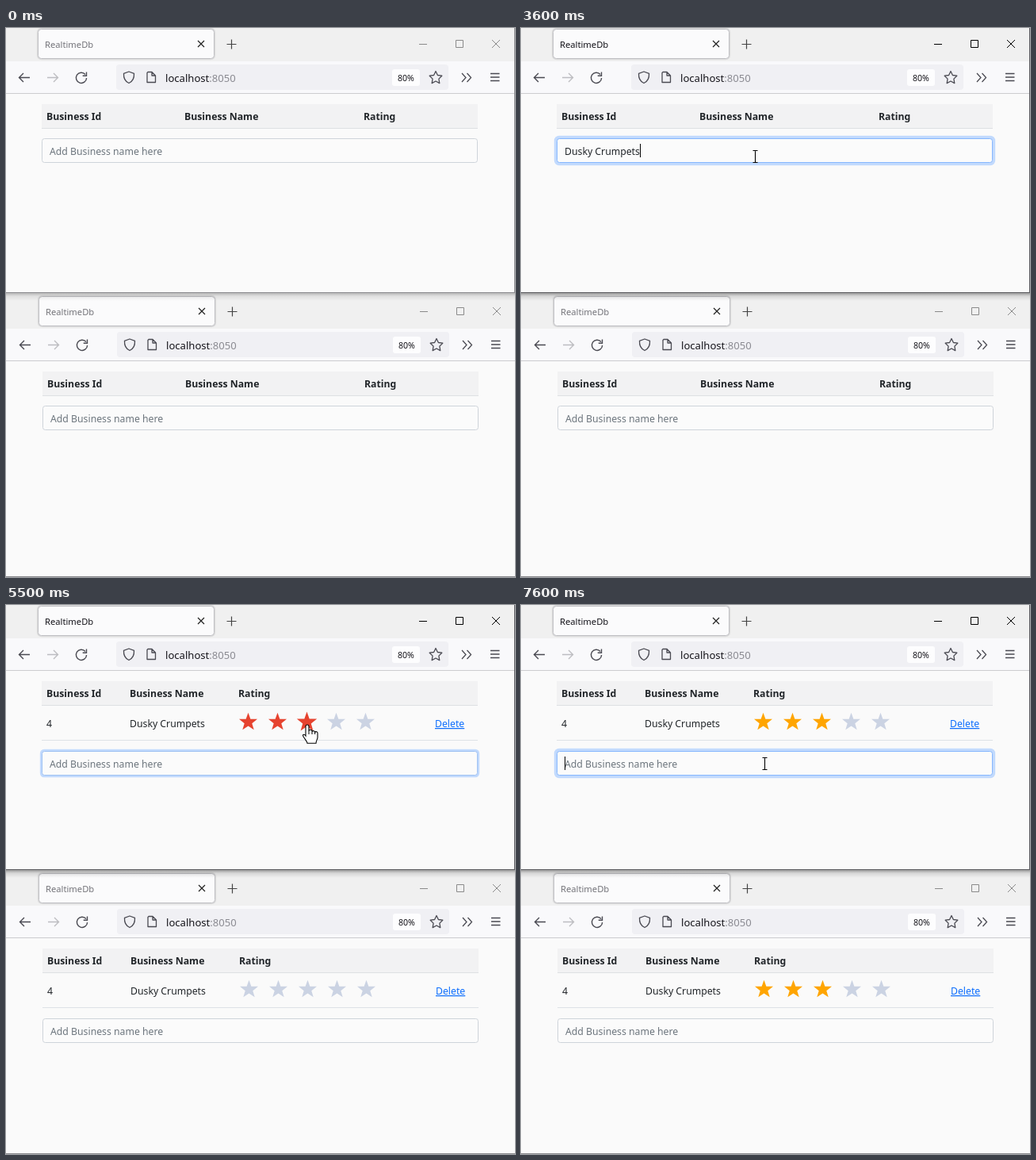
An HTML page that plays this animation: 642 px wide and 692 px high, repeating every 8000 ms.

```html
<!DOCTYPE html>
<html lang="en">
<head>
<meta charset="utf-8">
<title>RealtimeDb</title>
<style>
html, body { margin: 0; width: 100%; height: 100%; overflow: hidden; background: #fafafa; }
svg { display: block; font-family: "Noto Sans", sans-serif; }
text { white-space: pre; }
</style>
</head>
<body>
<svg id="stage" width="642" height="692" viewBox="0 0 642 692" xmlns="http://www.w3.org/2000/svg"></svg>
<script>
const LOOP = 8000, STEP = 100, SIZE = 12.25;
const NAME = "Dusky Crumpets";
const KEY_TIMES = [1300, 1500, 1800, 1900, 2100, 2300, 2600, 2800, 3000, 3100, 3200, 3400, 3500, 3600];
const ADDED = 3800;
const INK = "#212529", EMPTY = [203, 211, 227], HOVER = [230, 67, 47], RATED = [255, 165, 0];

// Pointer stops: time, x, y, shape
const POINTER = [
  [100, 338, 322, "arrow"], [200, 325, 276, "arrow"], [300, 312, 232, "arrow"], [400, 302, 193, "arrow"],
  [500, 295, 162, "beam"], [4600, 306, 160, "hand"], [4700, 340, 158, "hand"], [4800, 370, 157, "hand"],
  [4900, 377, 156, "hand"], [5000, 379, 153, "hand"], [5200, 380, 151, "hand"], [5900, 386, 205, "arrow"],
  [6000, 392, 259, "arrow"], [6100, 388, 257, "arrow"], [6200, 370, 250, "arrow"], [6300, 336, 238, "arrow"],
  [6400, 303, 223, "arrow"], [6500, 307, 200, "beam"]
];
const CARET_ON = [[600, 1100], [1300, 4100], [4600, 5100], [6600, 7100], [7600, 8000]];

const stage = document.getElementById("stage");
const pen = document.createElement("canvas").getContext("2d");
pen.font = `${SIZE}px "Noto Sans", sans-serif`;

const ramp = (t, start, span) => Math.min(1, Math.max(0, (t - start) / span));
const ease = p => p * p * (3 - 2 * p);
const mix = (a, b, p) => a.map((v, i) => Math.round(v + (b[i] - v) * p));
const rgb = c => `rgb(${c.join()})`;

const text = (x, y, str, fill = INK, size = SIZE, extra = "") =>
  `<text x="${x}" y="${y}" font-size="${size}" fill="${fill}" ${extra}>${str}</text>`;
const rect = (x, y, w, h, fill, extra = "") =>
  `<rect x="${x}" y="${y}" width="${w}" height="${h}" fill="${fill}" ${extra}/>`;
const line = (d, color, width = 1, extra = "") =>
  `<path d="${d}" fill="none" stroke="${color}" stroke-width="${width}" ${extra}/>`;

function titleBar(active) {
  const ctl = active ? "#000" : "#8a8a8a";
  return rect(0, 0, 642, 42, "#f0f0f0") +
    rect(40, 1, 223, 38, "none", `rx="4.5" stroke="#000" stroke-opacity=".08" stroke-width="2.5"`) +
    rect(40.5, 1.5, 222, 37, "#fbfbfc", `rx="4" stroke="#bfbfc3"`) +
    text(49, 24.5, "RealtimeDb", active ? "#15141a" : "#74747a", 11.2) +
    line("M242 16l8 8m0-8l-8 8", "#222", 1.2) +
    line("M278.5 20.5h12m-6-6v12", "#444", 1.2) +
    line("M521 20.5h10M567.5 15.5h9v9h-9zM613 15l10 10m0-10l-10 10", ctl);
}

function toolBar() {
  const c = "#4a4a52", arrow = "M30 62.5H16.5m5.5-5.5l-5.5 5.5 5.5 5.5";
  return rect(0, 42, 642, 40, "#f9f9fb") + rect(0, 82, 642, 1, "#cccccf") +
    line(arrow, c, 1.4) +
    line("M52 62.5h13.5m-5.5-5.5l5.5 5.5-5.5 5.5", "#bdbdc1", 1.4) +
    line("M100 58.5a6.6 6.6 0 1 0 1.6 4.5M101.5 55.5v4.8h-4.8", c, 1.4) +
    rect(139, 46, 419, 32, "#f0f0f4", `rx="4"`) +
    line("M155 55l6.5 2.3c.3 5-1.5 10-6.5 12.2-5-2.2-6.8-7.2-6.5-12.2z", c, 1.3, `stroke-linejoin="round"`) +
    line("M179 55.5h5l4.5 4.5v8.5h-10.5v-12zM184 55.5v4.5h4.5", c, 1.3, `stroke-linejoin="round"`) +
    text(201, 67.7, `localhost<tspan fill="#8b8b92">:8050</tspan>`, "#15141a", 13.1) +
    rect(487, 52, 35, 21, "#fdfdfe", `rx="3"`) +
    text(494, 67, "80%", "#15141a", 10.6) +
    line("M542 54.5l2.4 5 5.4.7-3.9 3.9.9 5.5-4.8-2.6-4.8 2.6.9-5.5-3.9-3.9 5.4-.7z", c, 1.3, `stroke-linejoin="round"`) +
    line("M575 57l5 5.5-5 5.5m6.5-11l5 5.5-5 5.5", c, 1.3) +
    line("M611 57.5h11.5m-11.5 4.5h11.5m-11.5 4.5h11.5", c, 1.3);
}

function star(i, color, scale) {
  return `<g transform="translate(${305.5 + 37 * i} 146.5) scale(${.48 * scale}) translate(-25 -23.5)">` +
    `<path d="m25 1 6 17h18l-14 11 5 17-15-10-15 10 5-17-14-11h18z" fill="${rgb(color)}"/></g>`;
}

function table(hasRow, stars) {
  const cols = hasRow ? [51, 156, 293] : [51, 225, 451];
  const heads = ["Business Id", "Business Name", "Rating"];
  let out = rect(45, 96, 550, 30, "#f2f2f3") + rect(45, 126, 550, 1, "#dee0e3") +
    heads.map((h, i) => text(cols[i], 116, h, INK, SIZE, `font-weight="700"`)).join("");
  if (hasRow) {
    out += text(51, 154, "4") + text(156, 154, NAME) + stars +
      text(541, 154, "Delete", "#0d6efd", SIZE, `text-decoration="underline"`) +
      rect(45, 170, 550, 1, "#dee2e6");
  }
  return out;
}

function field(y, focus, value, caret) {
  const border = rgb(mix([206, 212, 218], [134, 183, 254], focus));
  const ring = 3.2 * focus;
  let out = "";
  if (focus > 0) {
    out += rect(45 - ring, y - ring, 550 + 2 * ring, 31 + 2 * ring, "#c2dafd", `rx="${3 + ring}"`);
  }
  out += rect(45.5, y + .5, 549, 30, "#fbfbfb", `rx="3" stroke="${border}"`) +
    (value ? text(55, y + 21, value) : text(55, y + 21, "Add Business name here", "#6c757d"));
  if (caret) out += rect(Math.round(55 + pen.measureText(value).width), y + 7, 1, 17, "#000");
  return out;
}

function pointer(t) {
  const stop = POINTER.filter(p => p[0] <= t).pop();
  if (!stop) return "";
  const [, x, y, kind] = stop;
  const shapes = {
    arrow: `<path d="M.5.5v16l3.7-3.4 2.5 5.6 2.3-1-2.5-5.5h5z" fill="#fff" stroke="#000"/>`,
    beam: line("M-3-7.5h2.5l.5.5.5-.5h2.5M0-7V7M-3 7.5h2.5l.5-.5.5.5h2.5", "#000", 1.1),
    hand: `<path d="M-2 14V2a2 2 0 0 1 4 0v6a2 2 0 0 1 4 .6 2 2 0 0 1 3.7.9 1.8 1.8 0 0 1 3.3 1.2v5c0 3-2 4-2 7.5H0c0-2-3-5-5-8.5-1.5-2.5 1-3.5 3-.7z" fill="#fff" stroke="#000" stroke-width="1.1"/>` +
      line("M2 8v4m4-3.4v3.4m3.7-2.5v2.5", "#000")
  };
  const nudge = kind === "beam" ? .5 : 0;
  return `<g transform="translate(${x + nudge} ${y})">${shapes[kind]}</g>`;
}

// Stars under the pointer turn red, then settle to the saved rating.
function hoveredStars(t) {
  const settle = ease(ramp(t, 5860, 350));
  return [0, 1, 2, 3, 4].map(i => {
    if (i > 2) return star(i, EMPTY, 1);
    const start = 4500 + 100 * i;
    const color = mix(mix(EMPTY, HOVER, ease(ramp(t, start, 200))), RATED, settle);
    const grow = i === 2 ? ease(ramp(t, start, 200)) * (1 - settle) : 0;
    return star(i, color, 1 + .1 * grow);
  }).join("");
}

function savedStars(t) {
  const p = ease(ramp(t, 5500, 200));
  return [0, 1, 2, 3, 4].map(i => star(i, i < 3 ? mix(EMPTY, RATED, p) : EMPTY, 1)).join("");
}

function draw(t) {
  const active = t >= 600, hasRow = t >= ADDED;
  const y = hasRow ? 184 : 139;
  const value = hasRow ? "" : NAME.slice(0, KEY_TIMES.filter(k => k <= t).length);
  const focus = ramp(t, 600, 150) - ramp(t, 5450, 150) + ramp(t, 6600, 150);
  const caret = CARET_ON.some(([a, b]) => t >= a && t < b);
  const edge = active ? "#5c5c60" : "#8c8c90";
  const shade = active ? .36 : .24;

  stage.innerHTML =
    `<defs><linearGradient id="shade" x2="0" y2="1"><stop stop-opacity="${shade}"/>` +
    `<stop offset=".4" stop-opacity="${shade * .3}"/><stop offset="1" stop-opacity="0"/></linearGradient></defs>` +
    rect(0, 0, 642, 692, "#fafafa") + rect(0, 334, 642, 45, "#f0f0f0") +
    rect(0, 379, 642, 40, "#f9f9fb") + rect(0, 419, 642, 1, "#cccccf") +
    `<g transform="translate(1 337)">${titleBar(false)}${toolBar()}` +
    `${table(hasRow, savedStars(t))}${field(y, 0, "", false)}</g>` +
    rect(0, 691, 642, 1, "#8c8c90") +
    rect(0, 334, 642, 10, "url(#shade)") +
    rect(0, 0, 642, 334, "#fafafa") + titleBar(active) + toolBar() +
    table(hasRow, hoveredStars(t)) + field(y, focus, value, caret) +
    rect(641, 0, 1, 334, edge) + rect(0, 333, 642, 1, edge) +
    pointer(t);
}

const begin = performance.now();
let shown = -1;
function tick() {
  const t = Math.floor((performance.now() - begin) % LOOP / STEP) * STEP;
  if (t !== shown) draw(shown = t);
  requestAnimationFrame(tick);
}
tick();
</script>
</body>
</html>
```
